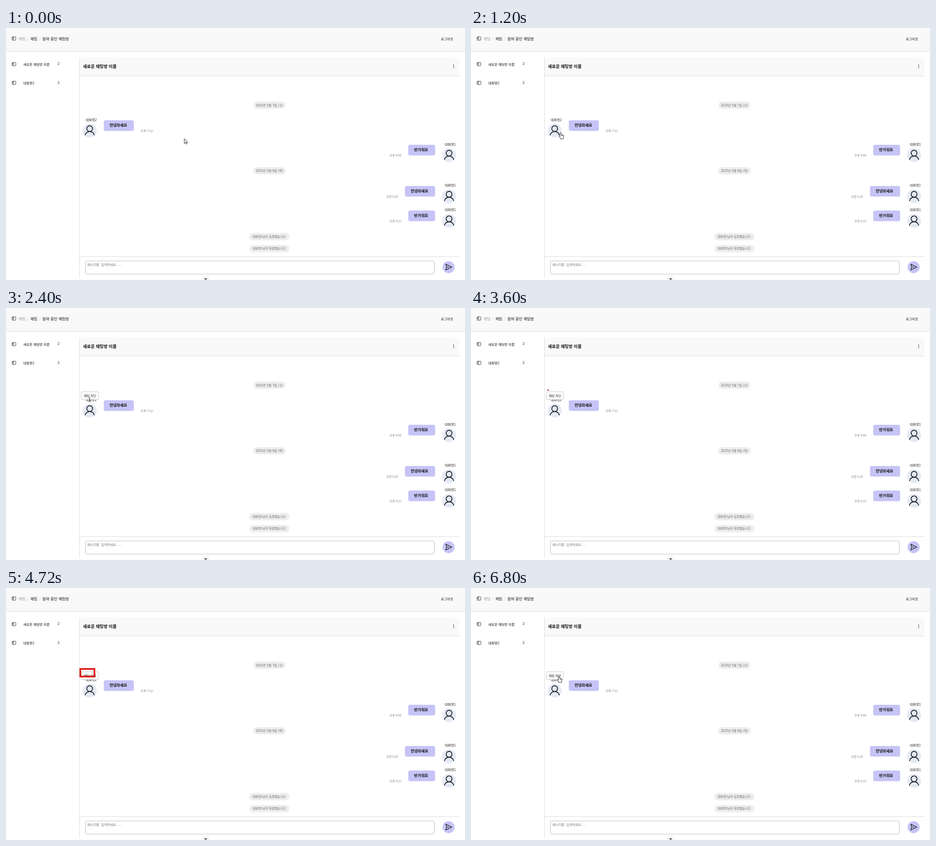
These frames come from a looping animation (1009 px wide and 555 px high, 8 s). An HTML page:

```html
<!DOCTYPE html>
<html lang="ko">
<head>
<meta charset="utf-8">
<style>
  html, body { margin: 0; width: 100%; height: 100%; overflow: hidden; background: #fff; }
  svg { display: block; width: 1009px; height: 555px; font-family: "Noto Sans CJK KR", "Noto Sans CJK", sans-serif; }
  .mono { font-family: "Liberation Mono", "Noto Sans Mono CJK KR", "Noto Sans CJK KR", monospace; }
  .line { fill: none; stroke: #dcdcdc; }
  .icon { fill: none; stroke: #333; stroke-width: .9; }
  .person { fill: none; stroke: #20242c; stroke-width: 1.9; stroke-linecap: round; }
  .pointer path { fill: #fff; stroke: #111; stroke-width: .9; stroke-linejoin: round; }
</style>
</head>
<body>
<svg id="stage" viewBox="0 0 1009 555" xmlns="http://www.w3.org/2000/svg"></svg>
<script>
const LOOP = 8000, STEP = 80;
const NAME = '대화명', LILAC = '#c6c4f6';

// y is the vertical middle of the glyphs
const text = (x, y, size, str, fill = '#111', weight = 400, extra = '') =>
  `<text x="${x}" y="${y + size * .37}" font-size="${size}" fill="${fill}" font-weight="${weight}" ${extra}>${str}</text>`;
const box = (x, y, w, h, fill, r = 0, extra = '') =>
  `<rect x="${x}" y="${y}" width="${w}" height="${h}" rx="${r}" fill="${fill}" ${extra}/>`;
const disc = (x, y, r, fill) => `<circle cx="${x}" cy="${y}" r="${r}" fill="${fill}"/>`;
const path = (d, cls) => `<path d="${d}" class="${cls}"/>`;

const panelIcon = y => box(13.4, y - 3.7, 8.2, 7.4, 'none', .8, 'class="icon"') +
  path(`M16.4 ${y - 3.7}v7.4M14 ${y - 1.8}h1.6M14 ${y}h1.6`, 'icon');

const room = (y, name) => panelIcon(y - .5) + text(38, y, 7.3, name) + text(113.5, y - 1.5, 7.6, '2');

const pill = (y, width, size, str) => box(579 - width / 2, y - 8, width, 16, '#eee', 8) +
  text(579, y, size, str, '#666', 400, 'text-anchor="middle"');

const avatar = (x, y) => disc(x, y, 15.3, '#e4eaf5') +
  `<circle cx="${x}" cy="${y - 4.4}" r="6.4" class="person"/>` +
  path(`M${x - 10} ${y + 9.6}C${x - 7} ${y - .4} ${x + 7} ${y - .4} ${x + 10} ${y + 9.6}`, 'person');

const message = (y, mine, x, width, str, timeX, time) =>
  text(mine ? 964.5 : 175, y - 24, 7.3, NAME + (mine ? 1 : 2), '#222', 500) +
  avatar(mine ? 974 : 184, y) +
  box(x, y - 22.7, width, 23.4, LILAC, 4) +
  text(x + 12.7, y - 11.7, 8.4, str, '#111', 700) +
  text(timeX, y + 1, 6.45, time, '#777');

const scene = [
  box(0, 0, 1009, 51.5, '#f9f9f9'),
  path('M0 51.5H1009', 'line'),
  panelIcon(23.2),
  text(27.8, 23.7, 8.2, '채팅', '#a39b95'),
  text(46.8, 23.7, 8.2, '/', '#bbb'),
  text(53.8, 23.7, 8.2, '채팅'),
  text(73.3, 23.7, 8.2, '/', '#bbb'),
  text(80, 23.7, 8.35, '참여 중인 채팅방'),
  text(956, 24, 7.3, '로그아웃'),
  room(80, '새로운 채팅방 이름'),
  room(121.3, NAME + '2'),

  box(161, 65, 836, 40.5, '#f9f9f9'),
  path('M161.5 65V551M161 105.5H997M161 503.5H997', 'line'),
  text(169.3, 85, 9.3, '새로운 채팅방 이름', '#111', 700),
  [81.3, 84.3, 87.3].map(y => disc(984, y, .9, '#222')).join(''),

  pill(170, 70, 7.06, '2025년 5월 7일 (수)'),
  message(226, false, 215, 66, '안녕하세요', 296.3, '오후 7:22'),
  message(280, true, 884.3, 59, '반가워요', 843, '오후 9:05'),
  pill(314.6, 72, 7.06, '2025년 5월 8일 (목)'),
  message(370.6, true, 877, 66.3, '안녕하세요', 835.7, '오전 9:25'),
  message(424.7, true, 884.3, 59, '반가워요', 843, '오전 9:27'),
  pill(459.5, 88, 6.65, NAME + '5님이 입장했습니다.'),
  pill(486, 88, 6.65, NAME + '5님이 퇴장했습니다.'),

  box(174.5, 513, 767, 29, '#fff', 4, 'stroke="#bdbdbd"'),
  text(179, 521, 7.1, '메시지를 입력하세요...', '#757575', 400, 'class="mono"'),
  disc(973, 526.7, 13.2, LILAC),
  `<path d="M966.7 520.2L980 526.7L966.7 533.2L968.7 526.7ZM968.7 526.7H973.5" fill="none" stroke="#222" stroke-width="1.3" stroke-linejoin="round"/>`,
  `<circle cx="439" cy="555.5" r="9" fill="#f7f7f7" stroke="#e6e6e6" stroke-width=".7"/>`,
  `<path d="M435.6 551H442.2L438.9 556Z" fill="#666"/>`,

  `<g id="tip">${box(165.5, 184.5, 37.5, 17, '#fff', 2, 'stroke="#c4c4c4"')}${text(171, 193.4, 6.9, '채팅 차단', '#222')}</g>`,
  `<rect id="mark" x="163.3" y="178.3" fill="none" stroke="#e01212" stroke-width="3.6"/>`,
  `<g id="arrow" class="pointer"><path d="M0 0V10.3L2.4 8.2L4.1 11.9L5.8 11.1L4.2 7.6H7.3Z"/></g>`,
  `<g id="hand" class="pointer"><path d="M-1.2 1.2a1.2 1.2 0 0 1 2.4 0V5L5.4 5.9Q6.7 6.3 6.5 8L5.8 11.5V14H-.8V12.3L-3.5 8.7Q-3.6 7.1 -2 7.9L-1.2 8.7ZM3 5.5v2M4.8 6v1.8"/></g>`,
  `<g id="beam"><path d="M-1.8 -4.6Q0 -4.6 0 -3.4Q0 -4.6 1.8 -4.6M0 -3.4V3.4M-1.8 4.6Q0 4.6 0 3.4Q0 4.6 1.8 4.6M-1 1.5H1" fill="none" stroke="#222" stroke-width="1"/></g>`,
  `<g id="dot">${disc(0, 0, 1.6, '#b52a2a')}</g>`,
];
const byId = id => document.getElementById(id);
byId('stage').innerHTML = scene.join('');

// time, x, y, pointer shape from then on
const track = [
  [0, 392, 244, 'arrow'], [400, 222, 240, 'arrow'], [640, 222, 240, 'arrow'],
  [720, 212, 236, 'arrow'], [880, 212, 236, 'arrow'], [1040, 199, 231, 'hand'],
  [1120, 199, 231, 'hand'], [1200, 197.3, 230.2, 'hand'], [2000, 197.3, 230.2, 'hand'],
  [2080, 196, 228, 'hand'], [2160, 196, 228, 'hand'], [2400, 183.7, 202, 'beam'],
  [2560, 183.7, 202, 'beam'], [2800, 174, 188, 'arrow'], [2960, 169.3, 180.7, 'arrow'],
  [3600, 169.3, 180.7, 'dot'], [3840, 165, 178.5, 'dot'], [4000, 165, 178.5, 'dot'],
  [4240, 163.3, 178.3, 'dot'], [4320, 163.3, 178.3, 'dot'], [4400, 173.7, 183.2, 'dot'],
  [4880, 204.8, 200.9, 'dot'], [5360, 204.8, 200.9, 'dot'], [5520, 208, 203, 'dot'],
  [6800, 193.4, 194, 'hand'], [LOOP, 193.4, 194, 'hand'],
];
const shapes = ['arrow', 'hand', 'beam', 'dot'];

function pointerAt(t) {
  const i = track.findIndex((key, n) => n === track.length - 1 || t < track[n + 1][0]);
  const [t0, x0, y0, shape] = track[i];
  const [t1, x1, y1, next] = track[Math.min(i + 1, track.length - 1)];
  const jumps = shape === 'dot' && next === 'hand';
  const k = jumps || t1 === t0 ? 0 : (t - t0) / (t1 - t0);
  return { x: x0 + (x1 - x0) * k, y: y0 + (y1 - y0) * k, shape };
}

const show = (el, on) => el.setAttribute('visibility', on ? 'visible' : 'hidden');

function draw(now) {
  const t = Math.floor(now % LOOP / STEP) * STEP;
  const { x, y, shape } = pointerAt(t);
  for (const id of shapes) show(byId(id), id === shape);
  byId(shape).setAttribute('transform', `translate(${x} ${y})`);
  show(byId('tip'), t >= 1760);

  const mark = byId('mark'), corner = pointerAt(Math.min(t, 4880));
  show(mark, t >= 4400 && t < 6800);
  mark.setAttribute('width', Math.max(0, corner.x - 163.3));
  mark.setAttribute('height', Math.max(0, corner.y - 178.3));
  requestAnimationFrame(draw);
}
requestAnimationFrame(draw);
</script>
</body>
</html>
```
